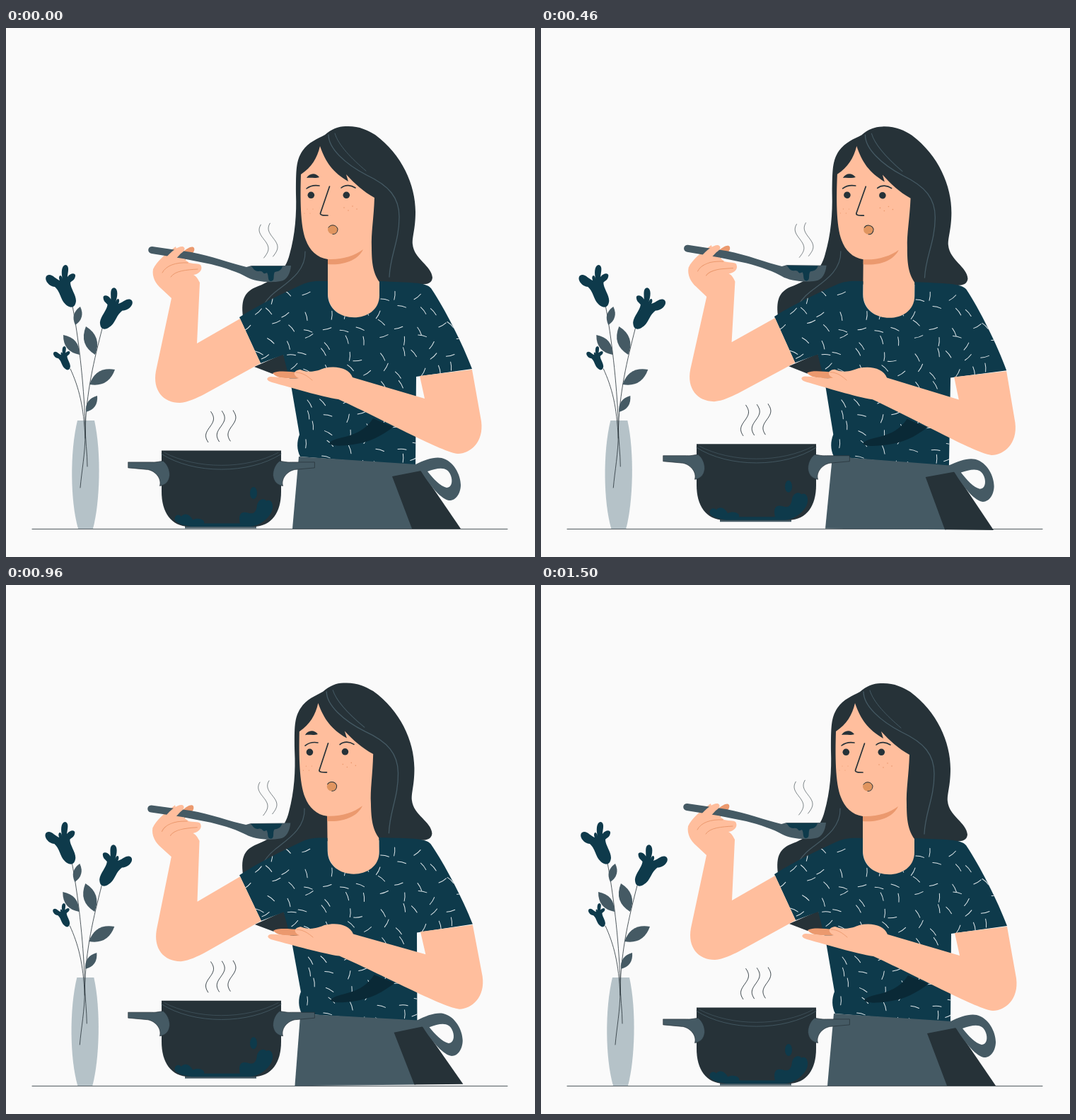
An HTML page with a canvas for the animation above (1.54 s loop, 748x748 px).

```html
<!DOCTYPE html>
<html lang="en">
<head>
<meta charset="utf-8">
<title>Tasting</title>
<style>
html, body { margin: 0; width: 100%; height: 100%; overflow: hidden; background: #fafafa; }
canvas { display: block; width: 748px; height: 748px; }
</style>
</head>
<body>
<canvas id="stage" width="748" height="748"></canvas>
<script>
const ctx = document.getElementById('stage').getContext('2d');
const BG = '#fafafa', DARK = '#263238', SLATE = '#455a64', TEAL = '#0e3a4b';
const SKIN = '#ffbe9d', SHADE = '#eb996e', GLASS = '#b5c2c8', FOLD = '#0a2936';
const LOOP = 1540, FPS = 24, CYCLE = 36, DEG = Math.PI / 180;

function fill(color, path, rule = 'nonzero') {
  ctx.fillStyle = color;
  ctx.fill(new Path2D(path), rule);
}

function line(color, width, path) {
  ctx.strokeStyle = color;
  ctx.lineWidth = width;
  ctx.stroke(new Path2D(path));
}

function oval(color, x, y, rx, ry = rx) {
  ctx.fillStyle = color;
  ctx.beginPath();
  ctx.ellipse(x, y, rx, ry, 0, 0, 7);
  ctx.fill();
}

function placed(draw, x, y, angle = 0, sx = 1, sy = sx) {
  ctx.save();
  ctx.translate(x, y);
  ctx.rotate(angle);
  ctx.scale(sx, sy);
  draw();
  ctx.restore();
}

function seeded(seed) {
  return () => (seed = seed * 16807 % 2147483647) / 2147483647;
}

function steam(color, x, y, height, swing, phase) {
  ctx.strokeStyle = color;
  ctx.lineWidth = .9;
  ctx.beginPath();
  for (let t = 0; t <= 1; t += .04)
    ctx.lineTo(x + swing * Math.sin(t * 5.8 + phase), y + height * t);
  ctx.stroke();
}

// Leaf from its base to its tip, bulging to both sides
function leaf(x, y, tipX, tipY) {
  const dx = tipX - x, dy = tipY - y, bulge = .42;
  const side = s => `${x + dx / 2 - s * dy * bulge} ${y + dy / 2 + s * dx * bulge}`;
  fill(SLATE, `M${x} ${y}Q${side(1)} ${tipX} ${tipY}Q${side(-1)} ${x} ${y}Z`);
}

function bell() {
  fill(TEAL, 'M-3 0C-16 -7 -13 -19 -23 -28C-33 -29 -39 -40 -34 -44C-28 -48 -22 -39 -16 -37C-19 -43 -14 -48 -12 -39C-14 -47 -14 -58 -8 -59C-1 -58 -5 -47 -5 -42C-1 -48 7 -48 6 -43C5 -37 0 -36 -1 -34C-1 -26 7 -17 7 -8C6 0 2 2 -3 0Z');
}

function vase() {
  fill(GLASS, 'M101 555H125C135 600 133 670 123 708H102C91 670 90 600 101 555Z');
  line(DARK, .8, 'M94 393C102 435 110 500 112 560C112 582 115 602 115 620');
  line(DARK, .8, 'M136 425C125 468 113 515 112 573C112 602 107 626 105 650');
  line(DARK, .8, 'M91 482C103 508 110 535 112 580');
  leaf(98, 420, 105, 394);
  leaf(104, 462, 81, 434);
  leaf(126, 462, 113, 422);
  leaf(118, 504, 154, 483);
  leaf(113, 543, 129, 520);
  placed(bell, 92, 394);
  placed(bell, 139, 425, 6 * DEG, -1, 1);
  placed(bell, 87, 483, 0, .56);
}

function hairAndFace() {
  fill(DARK, 'M480 139C498 138 511 144 522 151C560 179 579 222 579 260C579 285 574 295 575 306C577 327 602 336 603 353C602 363 592 363 580 362L456 362L336 414C331 385 337 374 352 367C378 357 395 345 401 320C409 292 411 262 410 235C410 200 410 188 419 174C428 161 440 157 451 151C460 143 470 139 480 139Z');
  line(SLATE, 1.3, 'M456 151C456 170 479 192 510 208C542 223 556 240 556 267C556 302 543 322 542 352');
  line(SLATE, 1, 'M465 149C470 166 489 185 509 202');
  line(SLATE, 1.2, 'M423 316C424 345 397 360 381 373C372 380 365 389 361 398');
  fill(SKIN, 'M417 207C432 197 440 184 444 167C452 190 462 204 484 217L481 207C493 220 505 231 521 240C520 270 516 290 517 310C517 335 520 348 528 359V379C528 423 455 420 455 375V327C440 325 429 314 424 300C416 280 416 240 417 207Z');
  fill(SHADE, 'M455 327C475 328 493 322 505 313C498 328 478 336 455 334Z');

  fill(DARK, 'M425 212C429 205 438 204 443 211C437 213 432 211 425 212Z');
  line(DARK, 1.6, 'M425 227C430 223 437 222 443 223');
  line(DARK, 1.6, 'M474 226C480 221 488 222 494 226');
  oval(DARK, 431.3, 236.3, 4.8);
  oval(DARK, 481.3, 236.3, 4.8);
  line(DARK, 1.7, 'M457.5 224L444.5 262C444 265 449 265 455 265');
  oval('#e0955f', 462, 285, 7, 6.5);
  line(DARK, 1, 'M456 282C459 277 467 278 469 284C469 289 466 292 462 291.5');
  for (let i = 0; i < 4; i++) {
    oval(SHADE, 478 + i * 6, 254 + i % 2 * 5 - i, .8);
    oval(SHADE, 422 + i * 4, 262 - i % 2 * 6, .6);
  }
}

// Scattered dashes on a jittered grid
function dashes() {
  const random = seeded(71);
  for (let y = 372; y < 615; y += 21)
    for (let x = 340; x < 660; x += 26)
      placed(() => line('#dfe7ea', 1, 'M-6 0Q0 -1.2 6 0'),
        x + random() * 18, y + random() * 15, random() * Math.PI);
}

function shirt() {
  fill(DARK, 'M351 479L392 461L398 478L410 486L377 489Z');
  const body = new Path2D('M455 358C440 357 428 358 418 363C390 376 360 390 330 409L360 474L392 462L403 505L415 575C411 585 411 596 416 606L579 619L580 493L659 482C646 447 620 396 601 368C594 359 570 360 528 358V378C528 420 455 420 455 376Z');
  ctx.fillStyle = TEAL;
  ctx.fill(body);
  ctx.save();
  ctx.clip(body);
  dashes();
  fill(FOLD, 'M457 587C466 576 500 582 519 552L548 564C530 577 515 586 490 589C475 591 459 592 457 587Z');
  ctx.restore();
}

function apron() {
  fill(SLATE, 'M414 606L580 617L590 627L576 708H405Z');
  fill(DARK, 'M546 634L587 626L643 708H574Z');
  fill(SLATE, 'M577 618C593 610 606 606 616 608C633 612 643 632 643 646C643 658 636 669 626 668C613 665 597 643 587 627ZM596 627C604 637 614 648 623 650C630 650 632 641 629 633C624 619 611 622 596 627Z', 'evenodd');
}

function spoonArm() {
  fill(SKIN, 'M240 309C225 320 213 330 208 341C206 352 212 362 219 368L234 382L212 485C207 512 222 530 246 530C258 529 270 523 280 518L360 474L331 411L270 446L274 360C271 354 269 351 265 349C273 348 278 342 276 337C276 332 266 334 259 332L243 320Z');
  fill(SHADE, 'M250 317C256 311 264 307 266 311C268 316 262 321 253 328Z');
  line(SHADE, 1, 'M221 346C226 336 240 331 257 332');
  line(SHADE, 1, 'M233 352C239 343 255 342 271 341');
  fill(SLATE, 'M207 309L262 317C290 322 318 333 340 338L347 336H403C402 347 397 357 388 358C372 361 350 358 340 352C330 346 310 339 290 334L250 326L206 319C199 318 200 308 207 309Z');
  fill(TEAL, 'M347 337H391C389 344 384 344 380 345C377 350 381 357 375 358C369 358 372 350 369 346C362 350 365 342 357 344C351 344 350 340 347 337Z');
  fill(SKIN, 'M226 325C234 315 244 308 250 309C255 311 252 316 247 319L236 331Z');
  steam('#6d7579', 364.5, 278, 49, -6.5, .7);
  steam('#6d7579', 377.5, 276, 49, -6.5, .7);
}

function openArm() {
  fill(SHADE, 'M377 488C385 484 400 486 414 487L420 496C400 495 384 497 377 488Z');
  fill(SKIN, 'M585 492L659 483L672 556C676 586 656 602 639 602C617 600 540 557 470 525C445 521 405 509 376 501C368 499 367 494 374 493C387 493 401 497 414 495C405 491 406 484 416 483C430 489 442 484 450 481C467 477 485 481 490 494L592 524Z');
  line(SHADE, .9, 'M410 487C420 487 427 493 433 498');
}

function woman() {
  hairAndFace();
  shirt();
  apron();
  spoonArm();
  openArm();
}

function handle() {
  const path = 'M-131.5 613.5H-99C-91 614 -87 612 -82 612C-76 617 -73 624 -73 632C-74 642 -80 646 -87 647C-84 637 -93 626 -104 624L-131.5 621.5Z';
  fill(SLATE, path);
  line(DARK, .7, path);
}

function pot() {
  fill(SLATE, 'M253 703H354V707H253Z');
  fill(DARK, 'M220 597H389V655C389 684 376 704 350 704.5H259C233 704 220 684 220 655Z');
  line(SLATE, .9, 'M220 602C265 631 344 631 389 602');
  line(SLATE, .7, 'M224 600C269 624 340 624 385 600');
  fill(TEAL, 'M239 696C237 688 244 686 248 690C254 683 262 690 264 695C272 691 282 695 280 700H331C328 688 332 682 342 685C350 688 354 684 355 674C358 664 366 665 368 668C378 664 380 680 373 688C367 697 355 704 345 704.5H262C250 703 242 700 239 696Z');
  oval(TEAL, 350, 657, 5, 8.5);
  placed(handle, 304.5, 0);
  placed(handle, 304.5, 0, 0, -1, 1);
  for (let i = 0; i < 3; i++)
    steam(DARK, 288 + i * 15.7, 542 - i * .8, 45, 5.5, .3);
}

const sway = p => 1 - 4 * Math.abs((p + .25) % 1 - .5);
const lift = p => 15 * Math.abs(1 - 2 * p) - 15;

// Sideways shiver through evenly spaced stops
function shake(p) {
  const stops = [0, -1, 2, -4, 4, -4, 4, -4, 2, -1, 0];
  const i = Math.floor(p * 10), part = p * 10 - i;
  return 1.5 * (stops[i] + (stops[i + 1] - stops[i]) * part);
}

function frame(ms) {
  const step = Math.ceil((Math.floor(ms / 10) + .5) * FPS / 100) - 1;
  const rest = .7 / CYCLE;
  const p = (rest + step / CYCLE) % 1;
  const moved = motion => motion(p) - motion(rest);

  ctx.fillStyle = BG;
  ctx.fillRect(0, 0, 748, 748);
  ctx.lineCap = ctx.lineJoin = 'round';
  line(DARK, .8, 'M37 708.5H709');
  placed(vase, moved(shake), 0);
  // The body sways around the middle of the chest
  placed(() => {
    ctx.translate(-437, -402);
    woman();
  }, 437, 402, -moved(sway) * .9 * DEG * -1);
  placed(pot, 0, moved(lift) + .4);
}

const start = performance.now();
function tick() {
  frame((performance.now() - start) % LOOP);
  requestAnimationFrame(tick);
}
tick();
</script>
</body>
</html>
```
